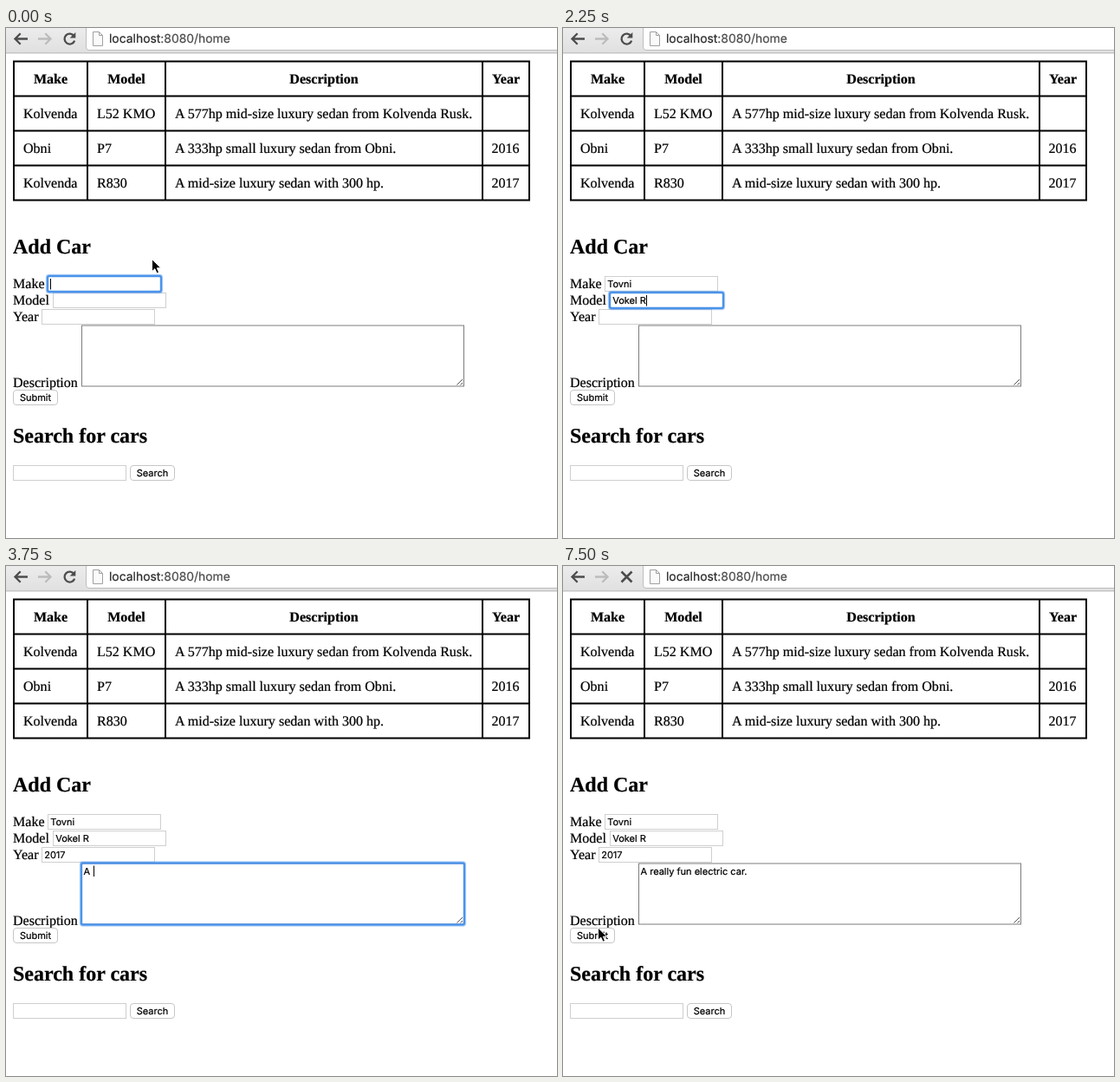
An HTML page that plays this animation: 636x588 px, repeating every 8000 ms.

```html
<!DOCTYPE html>
<html lang="en">
<head>
<meta charset="utf-8">
<title>Add Car</title>
<style>
  html, body { margin: 0; width: 100%; height: 100%; overflow: hidden; background: #fff; }
  svg { display: block; width: 100%; height: 100%; }
  text { white-space: pre; fill: #000; stroke: #000; stroke-width: .22px; text-rendering: geometricPrecision; }
  .serif { font: 16.06px "Liberation Serif", serif; }
  .bold { font-weight: bold; }
  .h2 { font: bold 24px "Liberation Serif", serif; }
  .ui { font: 11px Inter, sans-serif; }
  .url { font: 13.9px Inter, sans-serif; fill: #2a2a2a; stroke: #2a2a2a; }
  .path { fill: #4c4c4c; stroke: #4c4c4c; }
  .hint { font: bold 12.5px "DejaVu Sans", sans-serif; stroke: none; }
  .mid { text-anchor: middle; }
</style>
</head>
<body>
<svg id="stage" viewBox="0 0 636 588">
  <defs>
    <linearGradient id="bar" x2="0" y2="1">
      <stop offset="0" stop-color="#ececec"/><stop offset="1" stop-color="#e0e0e0"/>
    </linearGradient>
  </defs>
  <rect width="636" height="588" fill="#fff"/>

  <g id="toolbar">
    <rect width="636" height="29" fill="url(#bar)"/>
    <path d="M0 28.9H636" stroke="#b4b4b4"/>
    <path d="M640 25.5H96Q92.5 25.5 92.5 22V-2H640Z" fill="#fff" stroke="#bdbdbd"/>
    <g fill="none" stroke-width="2.3">
      <path d="M25 12.5H11M16.7 6.3L10.5 12.5L16.7 18.7" stroke="#4c4c4c"/>
      <path d="M37 12.5H51M45.3 6.3L51.5 12.5L45.3 18.7" stroke="#bcbcbc"/>
      <g id="reload" stroke="#4c4c4c">
        <path d="M78.6 9.3A6 6 0 1 0 79.2 14.6"/>
        <path d="M80.3 5V11.6H73.7Z" fill="#4c4c4c" stroke="none"/>
      </g>
      <path id="stop" d="M67.5 6.5L79.5 18.5M79.5 6.5L67.5 18.5" stroke="#4c4c4c" stroke-width="2.6"/>
    </g>
    <path d="M100.5 4.5H107.5L111.5 8.5V20.5H100.5ZM107.5 4.5V8.5H111.5" fill="#fafafa" stroke="#a0a0a0"/>
    <text class="url" x="119" y="17.2">localhost<tspan class="path">:8080/home</tspan></text>
  </g>

  <g id="page">
    <path d="M8 38.5H605M8 78.5H605M8 118.5H605M8 158.5H605M8 198.5H605M9 38V199M94 38V199M184 38V199M550 38V199M604 38V199"
      stroke="#000" stroke-width="2"/>
    <text class="h2" x="8" y="259.5">Add Car</text>
    <text class="h2" x="8" y="477.5">Search for cars</text>
  </g>
  <g id="fields"></g>
  <path d="M520.5 411.5L527 405M524.5 411.5L527 409" stroke="#555"/>

  <rect id="ring" fill="none" stroke="#4b93ea" stroke-width="2.4" rx="2"/>
  <rect id="glow" fill="none" stroke="#4b93ea" stroke-opacity=".4" stroke-width="1.2" rx="3"/>
  <path id="caret" stroke="#000"/>
  <g id="hint">
    <rect x="41.5" y="343.5" width="131" height="24.5" fill="#fff" stroke="#a3c8ea"/>
    <text class="hint" x="50" y="361">2017</text>
  </g>
  <path id="arrow" d="M0 0V14.2L3.3 11.2L5.6 16.3L8 15.2L5.8 10.3H10.2Z" fill="#000" stroke="#fff"/>
  <path id="beam" d="M-3.5 -7.5Q0 -7.5 0 -5.5Q0 -7.5 3.5 -7.5M0 -6V6M-3.5 7.5Q0 7.5 0 5.5Q0 7.5 3.5 7.5M-2 1.5H2"
    fill="none" stroke="#444" stroke-width="1.3"/>
</svg>
<script>
const $ = id => document.getElementById(id);

function add(parent, tag, attrs, content = '') {
  const el = document.createElementNS('http://www.w3.org/2000/svg', tag);
  for (const k in attrs) el.setAttribute(k, attrs[k]);
  el.textContent = content;
  return parent.appendChild(el);
}
const label = (cls, x, y, s) => add($('page'), 'text', { class: cls, x, y }, s);

// Table
const centers = [51.5, 139, 367, 577], lefts = [20, 105, 195, 560.5];
['Make', 'Model', 'Description', 'Year'].forEach((s, i) => label('serif bold mid', centers[i], 63.8, s));
[
  ['Kolvenda', 'L52 KMO', 'A 577hp mid-size luxury sedan from Kolvenda Rusk.', ''],
  ['Obni', 'P7', 'A 333hp small luxury sedan from Obni.', '2016'],
  ['Kolvenda', 'R830', 'A mid-size luxury sedan with 300 hp.', '2017']
].forEach((row, r) => row.forEach((s, i) => label('serif', lefts[i], 103.8 + 40 * r, s)));

// Form
function field(x, y, w, h, stroke, textX) {
  const at = { x: x + .5, y: y + .5, width: w - 1, height: h - 1 };
  add($('fields'), 'rect', { ...at, fill: '#fff', stroke });
  const text = add($('fields'), 'text', { class: 'ui', x: x + textX, y: y + 13.4 });
  return { x, y, w, h, text };
}
const input = (x, y) => field(x, y, 131, 18, '#cfcfcf', 3.2);
function button(x, y, w, s) {
  add($('page'), 'rect', { x: x + .5, y: y + .5, width: w - 1, height: 17, rx: 3.5, fill: '#fff', stroke: '#c6c6c6' });
  label('ui mid', x + w / 2, y + 12.9, s);
}
label('serif', 8, 299.6, 'Make');
label('serif', 8, 318.6, 'Model');
label('serif', 8, 337.6, 'Year');
label('serif', 8, 413.6, 'Description');
const fields = [
  input(48, 286),
  input(54, 305),
  input(41, 324),
  field(87, 342.5, 442, 71, '#7c7c7c', 2.5)
];
input(8, 504);
button(8, 417, 52, 'Submit');
button(143, 504, 52, 'Search');

// Each step: focused field (-1 for none) and the four values
const make = 'Tovni', model = 'Vokel R', year = '2017', note = 'A really fun electric car';
const filled = s => [3, make, model, year, s];
const steps = [
  [0, ''],
  [0, make[0]],
  [1, make],
  [1, make, model],
  [2, make, model, year],
  filled(note.slice(0, 2)),
  filled(note.slice(0, 13)),
  filled(note.slice(0, 16)),
  filled(note + ' to '),
  filled(note + '.'),
  [-1, make, model, year, note + '.']
];
const STEP = 750, LOOP = 8000;

const show = (id, on) => $(id).setAttribute('visibility', on ? 'visible' : 'hidden');
function place(id, x, y, on) {
  show(id, on);
  $(id).setAttribute('transform', `translate(${x} ${y})`);
}
function frame(id, f, pad) {
  const box = { x: f.x - pad, y: f.y - pad, width: f.w + 2 * pad, height: f.h + 2 * pad };
  for (const k in box) $(id).setAttribute(k, box[k]);
}

function draw(time) {
  const n = Math.floor(time % LOOP / STEP);
  const [focus, ...values] = steps[n];
  fields.forEach((f, i) => f.text.textContent = values[i] || '');

  const f = fields[focus];
  for (const id of ['ring', 'glow', 'caret']) show(id, f);
  if (f) {
    frame('ring', f, 0);
    frame('glow', f, 1.6);
    const x = Math.round(f.x + 3 + f.text.getComputedTextLength()) + .5;
    $('caret').setAttribute('d', `M${x} ${f.y + 3}v12.5`);
  }
  const leaving = n === steps.length - 1;
  show('hint', focus === 2);
  show('reload', !leaving);
  show('stop', leaving);
  place('arrow', leaving ? 40.5 : 168.5, leaving ? 417 : 266.5, n === 0 || leaving);
  place('beam', 100, 293.5, n === 9);
}

const start = performance.now();
function tick() {
  draw(performance.now() - start);
  requestAnimationFrame(tick);
}
tick();
</script>
</body>
</html>
```
